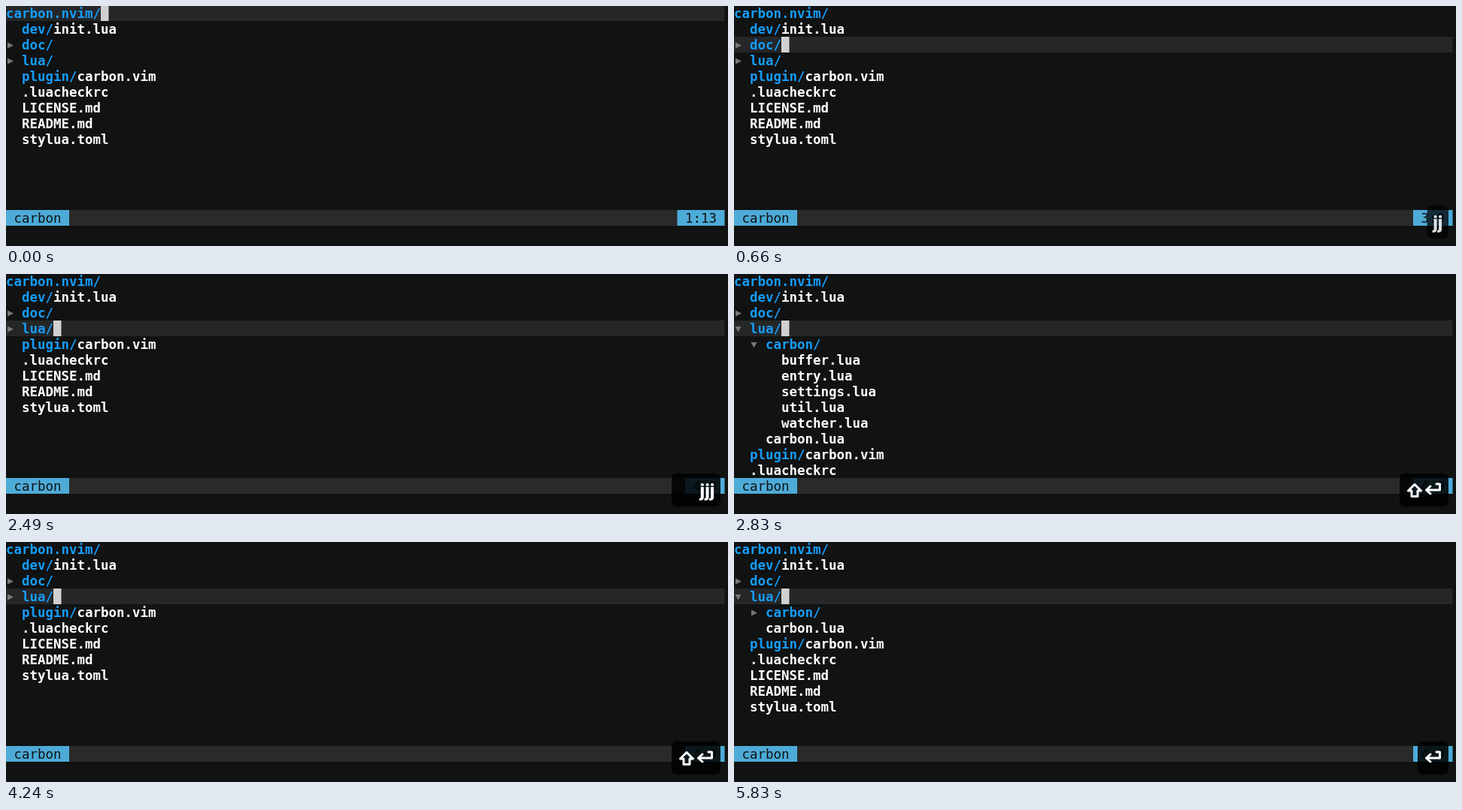
An HTML page with a canvas that plays this animation: 960x320 px, repeating every 6.83 s.

```html
<!DOCTYPE html>
<html lang="en">
<head>
<meta charset="utf-8">
<title>File tree demo</title>
<style>
  html, body { margin: 0; width: 100%; height: 100%; overflow: hidden; background: #111212; }
  canvas { display: block; width: 960px; height: 320px; }
</style>
</head>
<body>
<canvas id="stage" width="960" height="320"></canvas>
<script>
const ctx = document.getElementById('stage').getContext('2d');
const LOOP = 6830, CELL = 10.5, ROW = 21, COLS = 91;
const MONO = '17.44px "DejaVu Sans Mono", monospace';
const C = {
  bg: '#111212', line: '#252628', cursor: '#d0d0d0', dir: '#159dfb', file: '#ffffff',
  arrow: '#777777', bar: '#2a2a2a', badge: '#4dabd8', badgeText: '#111212'
};

// Leading spaces indent; + is a closed folder, - an open one.
const HEAD = ['carbon.nvim/', '  dev/init.lua', '+ doc/'];
const TAIL = ['  plugin/carbon.vim', '  .luacheckrc', '  LICENSE.md', '  README.md', '  stylua.toml'];
const CLOSED = [...HEAD, '+ lua/', ...TAIL];
const OPEN = [...HEAD, '- lua/', '  + carbon/', '    carbon.lua', ...TAIL];
const OPEN_ALL = [...HEAD, '- lua/', '  - carbon/',
  ...['buffer', 'entry', 'settings', 'util', 'watcher'].map(n => `      ${n}.lua`),
  '    carbon.lua', ...TAIL].slice(0, 13);

const TREES = [[0, CLOSED], [2540, OPEN_ALL], [3990, CLOSED], [5580, OPEN]];
const CURSORS = [
  [0, { row: 0, col: 12, label: '1:13' }],
  [500, { row: 1, col: 14, label: '2:15' }],
  [620, { row: 2, col: 6, label: '3:9' }],
  [750, { row: 3, col: 6, label: '4:9' }]
];
const KEYS = [
  [0, { left: 950, draw() {} }],
  [500, { left: 915, draw: drawJ }],
  [2490, { left: 885, draw: drawShiftReturn }],
  [3950, { left: 885, draw: drawShiftReturn }],
  [5540, { left: 909, draw: drawReturn }]
];
const FADES = [1, 300, 340, 290, 290];

const indexAt = (list, t) => list.findLastIndex(([start]) => t >= start);
const valueAt = (list, t) => list[indexAt(list, t)][1];

function rect(x, y, w, h, color) {
  ctx.fillStyle = color;
  ctx.fillRect(x, y, w, h);
}

function text(str, row, col, color, weight = 'bold') {
  ctx.font = `${weight} ${MONO}`;
  ctx.fillStyle = color;
  [...str].forEach((ch, i) => ctx.fillText(ch, (col + i) * CELL, row * ROW + 16));
}

function arrow(row, col, open) {
  const x = col * CELL + 5.5, y = row * ROW + 10.5;
  const points = open ? [[-4, -3.5], [4, -3.5], [0, 4]] : [[-3.5, -4], [4.5, 0], [-3.5, 4]];
  ctx.fillStyle = C.arrow;
  ctx.beginPath();
  points.forEach(([dx, dy]) => ctx.lineTo(x + dx, y + dy));
  ctx.fill();
}

function entry(str, row) {
  const mark = str.search(/[+-] /);
  if (mark >= 0) arrow(row, mark, str[mark] === '-');
  const col = str.search(/[a-zA-Z.]/);
  const split = str.lastIndexOf('/') + 1 || col;
  text(str.slice(col, split), row, col, C.dir);
  text(str.slice(split), row, split, C.file);
}

function stroke(points) {
  ctx.beginPath();
  points.forEach(([x, y]) => ctx.lineTo(x, y));
  ctx.strokeStyle = '#fff';
  ctx.lineWidth = 3;
  ctx.lineJoin = ctx.lineCap = 'round';
}

function drawReturn() {
  stroke([[934, 280], [938.5, 280], [938.5, 288], [921, 288]]);
  ctx.stroke();
  stroke([[926, 283], [920.5, 288], [926, 293]]);
  ctx.stroke();
}

function drawShiftReturn() {
  stroke([[905, 280.5], [913.5, 289], [909, 289], [909, 296.5], [901, 296.5], [901, 289], [896.5, 289]]);
  ctx.closePath();
  ctx.stroke();
  drawReturn();
}

function jCount(t) {
  return t < 620 ? 1 : t < 750 ? 2 : 3;
}

function drawJ(t) {
  ctx.font = '800 23.5px Inter, sans-serif';
  ctx.textAlign = 'right';
  ctx.fillStyle = '#fff';
  ctx.fillText('j'.repeat(jCount(t)), 942.5, 297);
  ctx.textAlign = 'left';
}

function overlay(t) {
  const i = indexAt(KEYS, t);
  if (!i) return;
  const [start, key] = KEYS[i];
  const p = Math.min(1, (t - start) / FADES[i]);
  const first = i === 1;
  const shown = first ? Math.min(1, 0.06 + (t - start) / 200) : 1;
  const left = first ? 935 - jCount(t) * 20 / 3 : key.left;
  ctx.globalAlpha = shown * 0.86;
  ctx.fillStyle = '#000';
  ctx.beginPath();
  ctx.roundRect(left, 266, 950 - left, 44, 7);
  ctx.fill();
  if (p < 1) {
    ctx.globalAlpha = 1 - p;
    KEYS[i - 1][1].draw(t);
  }
  ctx.globalAlpha = first ? shown : p;
  key.draw(t);
  ctx.globalAlpha = 1;
}

function render(t) {
  const cursor = valueAt(CURSORS, t);
  const width = COLS * CELL;
  rect(0, 0, 960, 320, C.bg);
  rect(0, cursor.row * ROW - 1, width, ROW, C.line);
  rect(cursor.col * CELL, cursor.row * ROW - 1, CELL, ROW, C.cursor);
  valueAt(TREES, t).forEach(entry);

  const badge = cursor.label.length + 2;
  rect(0, 272, width, ROW, C.bar);
  rect(0, 272, 8 * CELL, ROW, C.badge);
  rect((COLS - badge) * CELL, 272, badge * CELL, ROW, C.badge);
  text('carbon', 13, 1, C.badgeText, 'normal');
  text(cursor.label, 13, COLS - badge + 1, C.badgeText, 'normal');
  overlay(t);
}

const origin = performance.now();
function frame() {
  render((performance.now() - origin) % LOOP);
  requestAnimationFrame(frame);
}
frame();
</script>
</body>
</html>
```
